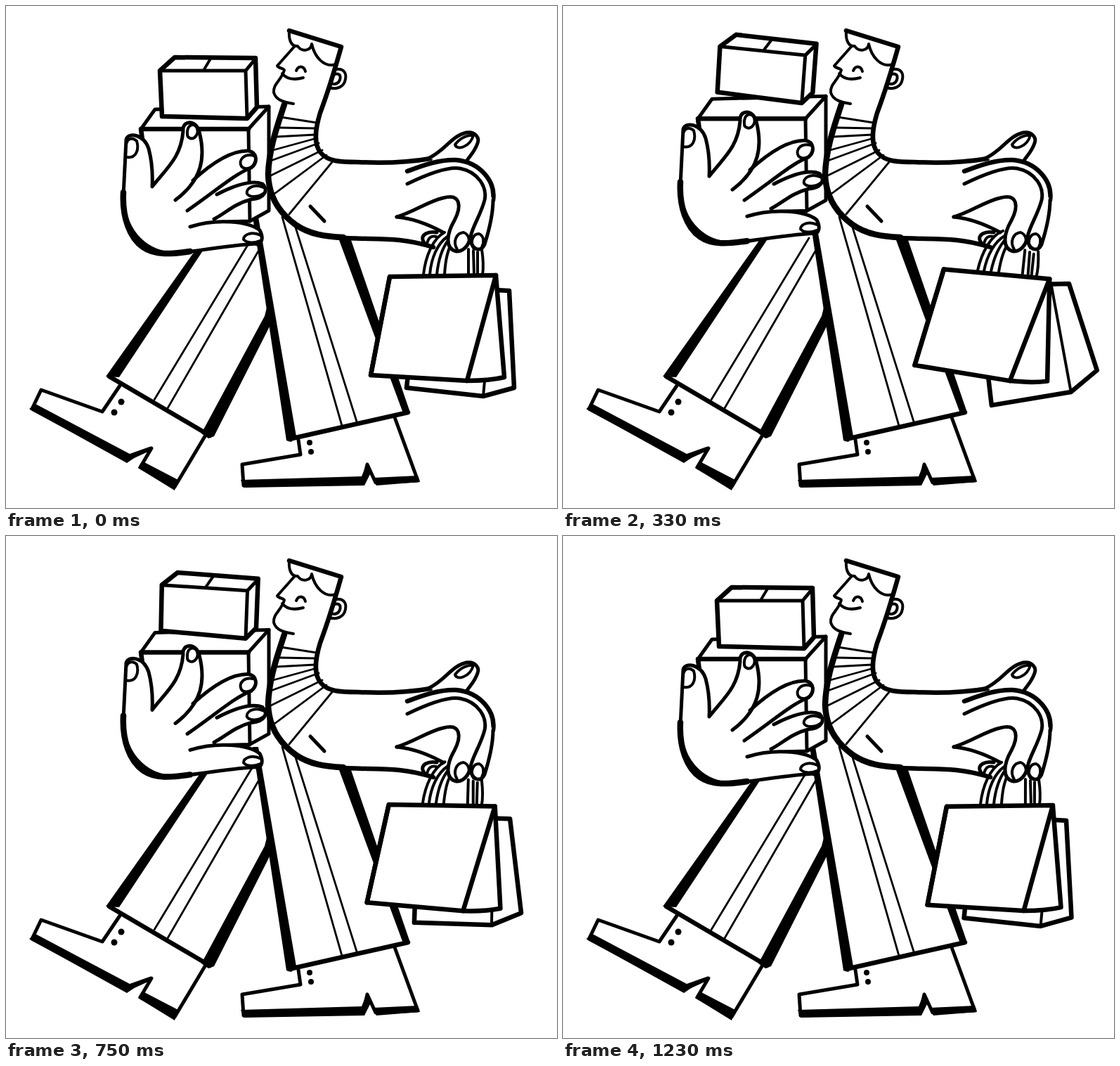
Animation, 784 px wide and 714 px high, one loop 1260 ms. Source, as an HTML page:

```html
<!DOCTYPE html>
<html lang="en">
<head>
<meta charset="utf-8">
<title>Shopper</title>
<style>
html, body { margin: 0; width: 100%; height: 100%; overflow: hidden; background: #fff; }
svg { display: block; width: 100vw; height: 100vh; }
path { fill: none; stroke: #000; stroke-width: 5; stroke-linecap: round; stroke-linejoin: round; }
.fill { fill: #fff; }
.blank { fill: #fff; stroke: none; }
.ink { fill: #000; stroke: none; }
.thin { stroke-width: 2.8; }
.mid { stroke-width: 4; }
.bold { stroke-width: 6.5; }
.heavy { stroke-width: 8.5; }
</style>
</head>
<body>
<svg viewBox="0 0 784 714">
  <g id="back-leg">
    <path class="fill" d="M162 540L137 577L50 546L37 573L172 645L207 629L191 656L240 684L283 612"/>
    <path class="ink" d="M33 573L42 566L176 637L207 626L172 650ZM188 657L195 648L245 674L240 689Z"/>
    <path class="blank" d="M150 527L303 300H375V440L290 612Z"/>
    <path class="thin" d="M211 560L350 330M230 572L364 340"/>
    <path class="ink" d="M142 527L303 300H312L161 528ZM278 608L368 441L372 425L380 446L296 612L288 615Z"/>
    <path class="bold" d="M147 527L290 611"/>
    <circle cx="164" cy="563" r="4.5"/><circle cx="154" cy="578" r="4.5"/>
  </g>

  <g id="front-leg">
    <path class="fill" d="M416 617L419 638L336 652L338 682L508 678L514 652L526 678L586 675L553 585"/>
    <path class="ink" d="M334 674L506 669L514 649L519 664L510 682L338 685ZM522 671L586 668L589 677L527 682Z"/>
    <path class="blank" d="M354 300L404 617L572 578L480 320Z"/>
    <path class="thin" d="M393 300L478 597M412 315L499 591"/>
    <path class="ink" d="M351 300H359L413 612L406 620L399 618ZM474 333H491L575 578L565 579Z"/>
    <path class="bold" d="M403 616L572 578"/>
    <circle cx="432" cy="621" r="4"/><circle cx="434" cy="634" r="4"/>
  </g>

  <g id="load">
    <path class="fill" d="M192 175L212 147L374 143V291L347 306L200 310Z" stroke="none"/>
    <path class="bold" d="M196 205L192 175H345"/>
    <path d="M345 175L374 143M345 175L347 306"/>
    <g id="parcel">
      <path class="fill bold" d="M219 92L240 73L355 74L357 144L343 160L222 157Z"/>
      <path d="M219 92H341L355 75M341 92L343 159"/>
      <path class="mid" d="M291 75L282 90"/>
    </g>
    <path class="blank" d="M358 338C320 343 280 346 250 352C205 357 167 325 167 270L171 190C174 178 197 182 204 205C209 223 209 238 209 256C230 230 250 215 252 180C250 162 270 160 275 180C281 205 281 225 268 249C290 226 320 205 345 206C357 208 358 221 349 229L300 268C325 255 350 248 366 253C372 262 368 272 345 276L296 304C320 304 350 308 363 320C367 330 363 337 358 338Z"/>
    <path class="heavy" d="M167 265C165 300 176 330 195 343C212 355 235 353 262 349"/>
    <path d="M358 338C320 340 280 347 250 351C205 357 167 325 167 270L171 190C174 179 196 182 203 203C208 222 209 238 208 257C228 231 249 216 252 178C250 163 270 160 275 179C284 214 280 247 241 276"/>
    <path d="M266 248C290 226 320 205 345 206C357 208 359 222 349 230C325 239 300 262 258 291"/>
    <path d="M300 268C325 255 350 247 365 253C374 262 368 274 349 275C325 281 312 295 296 303M262 314C300 302 345 306 361 319C367 330 364 338 357 339"/>
    <path class="mid" d="M172 215C184 217 190 206 186 192C181 187 174 188 172 194M258 183C257 169 266 166 271 172C276 182 268 190 262 188C259 187 258 185 258 183M353 213C339 209 330 219 335 228C340 234 352 231 354 222M366 258C352 252 341 260 343 267C347 273 360 272 367 266M362 326C350 320 338 325 338 332C343 338 354 337 361 334"/>
  </g>

  <g id="body">
    <path class="blank" d="M397 138C386 165 374 205 374 240C374 275 395 300 420 316C450 330 500 330 560 333L610 343L640 322L645 270L683 330L693 270C693 240 670 222 640 219L480 221C455 218 441 205 441 185L443 140Z"/>
    <path class="thin" d="M391 158L442 166M388 173L441 174M384 186L440 183M380 205L442 188M377 220L445 195M377 241L450 205M382 267L456 212M403 296L464 222"/>
    <path class="heavy" d="M396 140C387 168 374 202 373 240C374 272 390 295 412 311C432 325 455 328 480 329"/>
    <path class="bold" d="M470 329C500 332 530 330 560 333C580 335 598 340 608 343"/>
    <path class="bold" d="M403 35L477 58C468 90 456 128 447 152C440 175 437 196 448 209C458 221 475 222 500 222C540 224 575 222 604 217"/>
    <path class="mid" d="M403 36C402 50 407 58 415 57C421 66 434 64 435 54C439 72 452 88 469 83M410 58L386 85C388 89 394 88 396 91C392 106 380 110 381 123C384 134 396 137 409 139M393 96C400 105 412 105 423 102M413 92C416 84 424 85 426 93"/>
    <path class="mid" d="M466 91C479 87 485 94 483 104C481 116 470 119 460 116M466 98C474 94 477 99 475 105C473 111 467 112 462 110"/>
    <path d="M433 285L453 306"/>
    <path class="fill" d="M600 217C625 206 633 185 655 180C668 178 674 188 671 195C667 207 661 212 655 221"/>
    <path class="mid" d="M639 197C641 206 660 201 665 184C656 183 646 188 639 197"/>
    <path class="bold" d="M571 235C590 228 615 218 640 219C675 222 697 250 693 276"/>
    <path d="M556 300C578 302 600 310 622 322M613 322C600 320 591 325 593 333C595 340 602 342 608 343"/>
    <path class="mid" d="M599 338C601 329 606 326 612 328"/>
  </g>

  <g id="bag-back">
    <path id="bag-shape" class="fill bold"/>
    <path id="bag-fold" class="mid"/>
  </g>
  <g id="bag-front">
    <path class="mid" d="M594 382C597 355 608 330 624 322M603 382C605 358 614 338 628 328M613 382C615 362 620 345 630 332M624 382C625 365 628 350 632 342M658 382V346M666 382L665 348M671 382V350M678 382C680 370 679 360 677 346"/>
    <path class="fill bold" d="M546 385L697 383L709 528C692 532 675 533 656 533L519 525Z"/>
    <path class="bold" d="M697 383L656 533M546 385L519 525"/>
  </g>

  <g id="fingers">
    <path class="blank" d="M625 273C646 266 648 284 638 305C626 325 625 347 642 349C652 349 658 342 660 335C662 347 674 350 681 340C686 320 693 295 693 278C680 240 650 235 625 273Z"/>
    <path d="M556 300C580 293 600 278 622 273C648 266 648 286 638 305C627 324 624 345 641 349C650 349 656 343 660 333"/>
    <path d="M571 253C600 239 628 228 646 231C672 236 685 258 681 276C676 296 664 313 661 328C661 348 676 351 681 339C687 320 693 296 693 276"/>
    <path class="mid" d="M642 346C635 335 641 323 651 322C659 325 661 334 656 341M665 344C660 334 665 324 673 324C680 327 681 336 677 343"/>
  </g>
</svg>
<script>
const LOOP = 1260, STEP = 30;
const $ = id => document.getElementById(id);

// Pairs of time and value, joined by cosine easing
const LIFT = [[30, 0], [520, 1], [945, 0]];
const SWING = [[15, 0], [345, 1], [660, .07], [945, 1], [1260, 0]];
const TRAIL = [[15, 0], [345, 1], [660, .17], [945, .62], [1260, 0]];

// Far bag corners at rest and fully swung: x, y, x, y
const CORNERS = [
  [585, 398, 590, 398], [716, 405, 720, 395], [723, 543, 760, 518],
  [679, 555, 723, 549], [570, 543, 610, 568]
];
const FOLD = [[693, 403, 695, 398], CORNERS[3]];

function track(keys, t) {
  const i = keys.findIndex(k => k[0] > t);
  if (i === 0) return keys[0][1];
  if (i < 0) return keys[keys.length - 1][1];
  const [t0, a] = keys[i - 1], [t1, b] = keys[i];
  return a + (b - a) * (1 - Math.cos(Math.PI * (t - t0) / (t1 - t0))) / 2;
}

const morph = (points, k) => "M" + points.map(([x, y, u, v]) =>
  `${x + (u - x) * k} ${y + (v - y) * k}`).join("L");

function draw() {
  const t = Math.floor(performance.now() % LOOP / STEP) * STEP;
  const lift = track(LIFT, t), swing = track(SWING, t), trail = track(TRAIL, t);

  $("load").setAttribute("transform", `translate(0 ${-22 * lift})`);
  $("parcel").setAttribute("transform",
    `translate(${lift} ${-20 * lift}) rotate(${8.8 * lift} 281 125)`);
  $("bag-front").setAttribute("transform", `rotate(${6 * swing} 645 340)`);
  $("bag-shape").setAttribute("d", morph(CORNERS, trail) + "Z");
  $("bag-fold").setAttribute("d", morph(FOLD, trail));
  requestAnimationFrame(draw);
}
draw();
</script>
</body>
</html>
```
